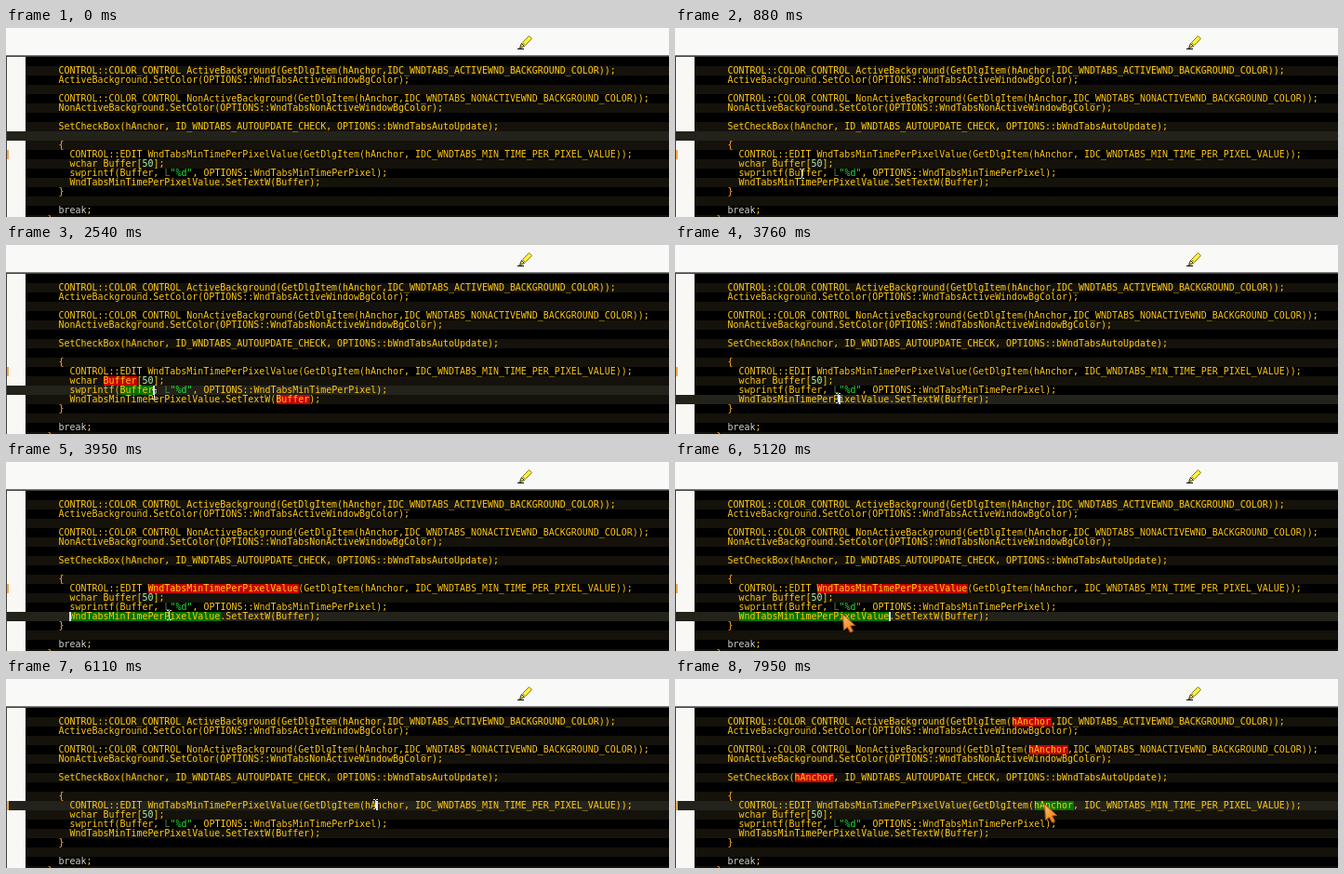
An HTML page with a canvas for the animation above (8 s loop, 713x203 px).

```html
<!DOCTYPE html>
<html lang="en">
<head>
<meta charset="utf-8">
<title>Highlighting matching words in a code editor</title>
<style>
  html, body { margin: 0; width: 100%; height: 100%; overflow: hidden; background: #000; }
  canvas { display: block; }
</style>
</head>
<body>
<canvas id="stage" width="713" height="203"></canvas>
<script>
const ctx = document.getElementById('stage').getContext('2d');
const WIDTH = 713, HEIGHT = 203, LOOP = 8000;
const CHAR = 6, ROW = 10, TOP = 31, LEFT = 57, GUTTER = 21;
const GOLD = '#ffc814', RED = '#c80000', GREEN = '#007400';

// Keyed by row; columns count from the "CONTROL" indent.
const lines = {
  1: 'CONTROL::COLOR_CONTROL ActiveBackground(GetDlgItem(hAnchor,IDC_WNDTABS_ACTIVEWND_BACKGROUND_COLOR));',
  2: 'ActiveBackground.SetColor(OPTIONS::WndTabsActiveWindowBgColor);',
  4: 'CONTROL::COLOR_CONTROL NonActiveBackground(GetDlgItem(hAnchor,IDC_WNDTABS_NONACTIVEWND_BACKGROUND_COLOR));',
  5: 'NonActiveBackground.SetColor(OPTIONS::WndTabsNonActiveWindowBgColor);',
  7: 'SetCheckBox(hAnchor, ID_WNDTABS_AUTOUPDATE_CHECK, OPTIONS::bWndTabsAutoUpdate);',
  9: '{',
  10: '  CONTROL::EDIT WndTabsMinTimePerPixelValue(GetDlgItem(hAnchor, IDC_WNDTABS_MIN_TIME_PER_PIXEL_VALUE));',
  11: '  wchar Buffer[50];',
  12: '  swprintf(Buffer, L"%d", OPTIONS::WndTabsMinTimePerPixel);',
  13: '  WndTabsMinTimePerPixelValue.SetTextW(Buffer);',
  14: '}',
  16: 'break;'
};

const activeRows = [[0, 8], [1070, 12], [3760, 13], [6110, 10]];

// Each selected word is green in its own row and red everywhere else.
const selections = [
  { from: 1260, to: 3760, word: 'Buffer', row: 12 },
  { from: 3950, to: 6110, word: 'WndTabsMinTimePerPixelValue', row: 13 },
  { from: 6310, to: LOOP, word: 'hAnchor', row: 10 }
];

// [from, to, x]
const carets = [
  [1070, 1260, 134], [1260, 1780, 158], [2300, 2780, 158], [3300, 3760, 158],
  [3760, 3950, 176], [3950, 4010, 68], [4010, 4590, 230], [5120, 5660, 230],
  [6110, 6310, 398], [6310, 6900, 428], [7430, 7950, 428]
];

const moves = [
  { from: 450, to: 880, steps: 7, a: [160, 144], b: [136, 156] },
  { from: 2300, to: 2780, steps: 9, a: [136, 156], b: [175, 163] },
  { from: 3500, to: 3500, steps: 1, a: [175, 163], b: [175, 164] },
  { from: 5120, to: 5720, steps: 11, a: [175, 164], b: [397, 134] }
];

const arrowTimes = [[1320, 2540], [4070, 5240], [6370, LOOP]];

const during = t => ([from, to]) => t >= from && t < to;

function box(x, y, w, h, color) {
  ctx.fillStyle = color;
  ctx.fillRect(x, y, w, h);
}

function polygon(points, fill, stroke) {
  ctx.beginPath();
  points.forEach(([x, y]) => ctx.lineTo(x, y));
  ctx.closePath();
  ctx.fillStyle = fill;
  ctx.fill();
  ctx.strokeStyle = stroke;
  ctx.lineWidth = 1;
  ctx.stroke();
}

const rowY = row => TOP + row * ROW;

function tokenColor(token) {
  if (token === 'break') return '#d2d2cc';
  if (token === 'L') return '#4a7a4a';
  if (token[0] === '"') return '#1ee63c';
  if (/^\d/.test(token)) return '#b4f0b4';
  if (/^[{}]/.test(token)) return '#ffa83c';
  return GOLD;
}

function drawText(text, x, y) {
  const special = 'L(?=")|"[^"]*"|\\b\\d+\\b|\\bbreak\\b|[{}]';
  for (const match of text.matchAll(new RegExp(`${special}|(?:(?!${special}).)+`, 'g'))) {
    ctx.fillStyle = tokenColor(match[0]);
    ctx.fillText(match[0], x + match.index * CHAR, y + 8);
  }
}

function drawHighlights(t) {
  const selection = selections.find(s => t >= s.from && t < s.to);
  if (!selection) return;
  const { word, row: home } = selection;
  for (const [row, text] of Object.entries(lines)) {
    for (const match of text.matchAll(new RegExp('\\b' + word + '\\b', 'g'))) {
      box(LEFT + match.index * CHAR, rowY(row), word.length * CHAR, ROW, +row === home ? GREEN : RED);
    }
  }
}

function drawToolbar() {
  box(0, 0, WIDTH, 29, '#f9f9f8');
  box(0, 29, WIDTH, 1, '#808080');
  box(0, 30, WIDTH, 1, '#404040');
  // Highlighter pen
  polygon([[555.5, 15.5], [562.5, 8.5], [565.5, 11.5], [558.5, 18.5]], '#fff03c', '#8a7c10');
  polygon([[554.5, 16.5], [557.5, 19.5], [552.5, 21.5]], '#fff03c', '#302c08');
  box(550, 22, 7, 1, '#000');
}

function drawIBeam(x, y) {
  for (const end of [y - 5, y + 5]) {
    box(x - 2, end, 2, 1, '#dce8ff');
    box(x + 1, end, 2, 1, '#dce8ff');
  }
  box(x, y - 4, 1, 9, '#dce8ff');
}

function drawArrow(x, y) {
  const shape = [[0, 0], [13, 12], [8, 12.5], [11, 18], [8, 19.5], [5, 14], [1, 17]];
  const fill = ctx.createLinearGradient(x, y, x + 9, y + 19);
  fill.addColorStop(0, '#ffc46a');
  fill.addColorStop(1, '#f08020');
  polygon(shape.map(([dx, dy]) => [x + dx + 0.5, y + dy + 0.5]), fill, '#b85a14');
}

function pointerAt(t) {
  const move = moves.findLast(m => t >= m.from);
  if (!move) return null;
  const { from, to, steps, a, b } = move;
  const gap = (to - from) / (steps - 1) || 1;
  const p = Math.min(Math.floor((t - from) / gap + 0.01) + 1, steps) / steps;
  const eased = p * p * (3 - 2 * p);
  return a.map((start, i) => Math.round(start + (b[i] - start) * eased));
}

function draw(t) {
  const activeRow = activeRows.findLast(([from]) => t >= from)[1];

  box(0, 0, WIDTH, HEIGHT, '#000');
  for (let row = 1; row < 18; row += 2) box(GUTTER, rowY(row), WIDTH, ROW, '#14120a');
  box(0, TOP, GUTTER, HEIGHT, '#f9f8f5');
  box(0, TOP, 1, HEIGHT, '#404040');
  box(1, rowY(activeRow), WIDTH, ROW, '#24231b');
  box(1, rowY(10), 2, ROW, '#f0a850');
  drawToolbar();

  drawHighlights(t);
  ctx.font = '9.967px "DejaVu Sans Mono", monospace';
  for (const [row, text] of Object.entries(lines)) drawText(text, LEFT - 0.5, rowY(row));
  drawText('}', LEFT - 2 * CHAR - 0.5, rowY(17));

  const caret = carets.find(during(t));
  if (caret) box(caret[2], rowY(activeRow), 2, ROW, '#dce8ff');

  const pointer = pointerAt(t);
  if (pointer) (arrowTimes.some(during(t)) ? drawArrow : drawIBeam)(...pointer);
}

const startTime = performance.now();
function tick() {
  draw((performance.now() - startTime) % LOOP);
  requestAnimationFrame(tick);
}
tick();
</script>
</body>
</html>
```
